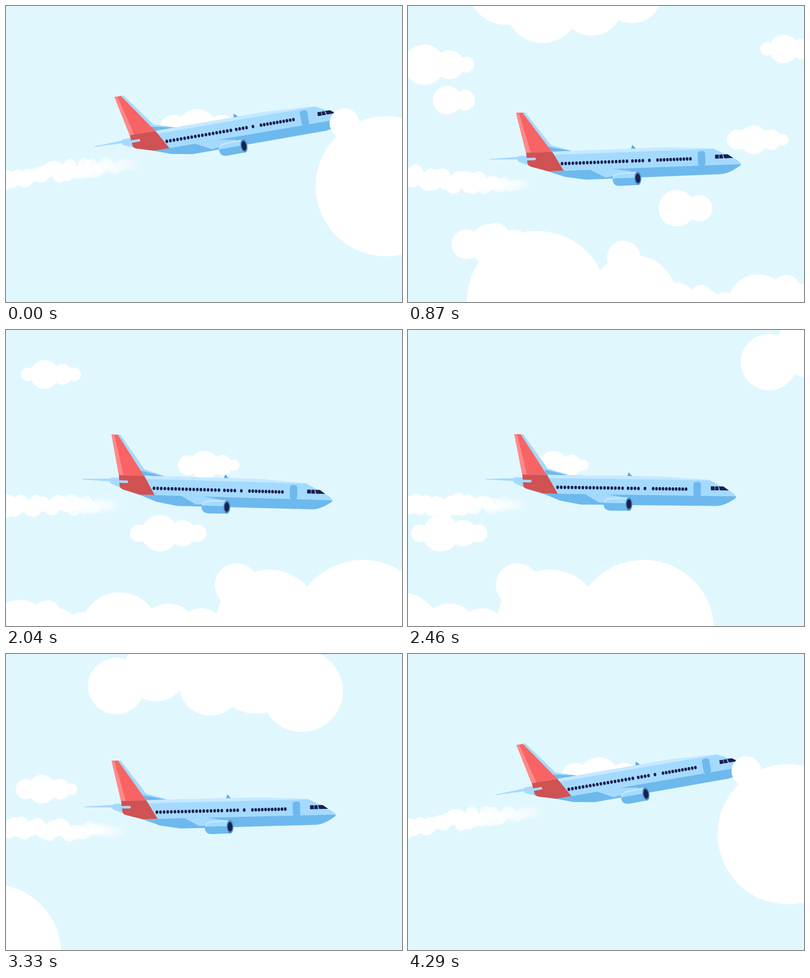
Write an HTML page with a canvas that moves like this. It is 800 by 600 pixels and loops after 4.32 s.

```html
<!DOCTYPE html>
<html lang="en">
<head>
<meta charset="utf-8">
<title>Plane in the clouds</title>
<style>
html, body { margin: 0; width: 100%; height: 100%; overflow: hidden; background: #e1f7fe; }
canvas { display: block; }
</style>
</head>
<body>
<canvas id="stage" width="800" height="600"></canvas>
<script>
const ctx = document.getElementById('stage').getContext('2d');
const LOOP = 4320, CYCLE = 4290, STEP = 30, SWAP = 3560;
const SKY = '#e1f7fe', LIGHT = '#a5daff', BLUE = '#6db9ed', SHINE = '#c6e9ff', NAVY = '#1a1f50';
const PIVOT = { x: 180, y: 10 };

const bump = (t, mid, width) => Math.exp(-(((t - mid) / width) ** 2));
const wave = (t, peak, period) => Math.cos(2 * Math.PI * (t - peak) / period);

// The plane climbs around time zero, then sways in level flight.
function pose(t) {
  const climb = bump(t, 280, 500);
  return {
    x: 485 + 26 * climb - 6.5 * bump(t, 2100, 400),
    y: 331.5 + 5.7 * wave(t, 1750, 2800) - 77 * bump(t, 100, 490),
    angle: (1.9 * wave(t, 1700, CYCLE) - 11.3 * climb) * Math.PI / 180,
    roll: bump(t, 2750, 800)
  };
}
const camera = t => 600 / (1 + Math.exp((t + 78) / 179));

// A cloud is one main disc with smaller ones beside it; sizes are relative.
function cloud(x, y, r, left = 0, tail = 0) {
  return [
    [x - 1.15 * r, y, left * r], [x, y, r],
    [x + 1.23 * r, y, 0.72 * r], [x + 2.06 * r, y, tail * r]
  ];
}

// Positions are those at 870 ms.
const far = [
  ...cloud(165, 486, 41, 0.73, 0.39),
  ...cloud(698, 274, 29, 0.7, 0.39)
];
const near = [
  ...cloud(33, 122, 41, 0, 0.39),
  ...cloud(79, 194, 29),
  ...cloud(543, 413, 37),
  ...cloud(759, 90, 29, 0.48, 0.48),
  ...cloud(992, 412, 37, 0.48, 0.48),
  // upper banks
  [199, -39, 80], [272, 3, 75], [371, 0, 63], [452, -24, 62],
  [1655, 65, 57], [1735, 32, 64], [1783, -24, 54], [1845, 62, 63], [1938, 29, 92], [2030, 75, 83],
  // lower bank
  [261, 601, 142], [455, 596, 88], [1212, 592, 106], [1402, 608, 142],
  ...cloud(538, 613, 50, 0, 0.6),
  ...cloud(708, 609, 62, 0, 0.6),
  ...cloud(911, 612, 80, 0, 0.6),
  [177, 473, 30], [436, 513, 34], [593, 588, 20], [764, 577, 29], [1147, 517, 44]
];
const wipe = [
  [-38, 235, 364], [352, 619, 355], [775, 710, 268], [851, -28, 60],
  ...[0, 300, 600].map(y => [-1000, y, 220])
];

function disc(x, y, rx, ry = rx) {
  ctx.beginPath();
  ctx.ellipse(x, y, rx, ry, 0, 0, 7);
  ctx.fill();
}
function shape(color, d) {
  ctx.fillStyle = color;
  ctx.fill(new Path2D(d));
}
function clouds(list, dx, dy) {
  ctx.fillStyle = '#fff';
  for (const [x, y, r] of list) disc(x + dx, y + dy, r);
}
function random(n) {
  const v = Math.sin(n * 127.1 + 3.7) * 43758.5453;
  return v - Math.floor(v);
}

// Each puff stays at the height where the engine left it.
function trail(t) {
  const gap = 13, back = -72 - PIVOT.x, low = 37 - PIVOT.y;
  ctx.fillStyle = '#fff';
  for (let k = Math.floor(t / gap), age; (age = t - k * gap) < 680; k--) {
    const { x, y, angle } = pose(k * gap), grow = Math.min(1, age / 250);
    const sin = Math.sin(angle), cos = Math.cos(angle);
    ctx.globalAlpha = Math.min(1, 0.12 + age / 300);
    disc(
      x + back * cos - low * sin - age * 0.5,
      y + back * sin + low * cos + (random(k) - 0.5) * (8 + 14 * grow),
      11 + random(k + 0.5) * 6 * grow
    );
  }
  ctx.globalAlpha = 1;
}

function windows(x, count, gap) {
  for (let i = 0; i < count; i++) disc(x + i * gap, 0, 2.7, 3.5);
}

// Local origin is the rearmost cabin window.
function plane(t) {
  const { x, y, angle, roll } = pose(t);
  const edge = 14.6 - 1.5 * roll, shift = 3 * roll;
  ctx.save();
  ctx.translate(x, y);
  ctx.rotate(angle);
  ctx.translate(-PIVOT.x, -PIVOT.y);

  // tail fin
  shape(LIGHT, 'M-76 -106.3L-71 -106.8L-20.6 -37.8L22 -25H-24Z');
  shape(BLUE, 'M-27 -35L20 -25H-22Z');
  shape('#f86464', `M-89 -106.4H-76L${-19 - shift} -24H-71.7Z`);
  shape('#ff898b', 'M-89 -106.4H-83.5L-62 -24H-71.7Z');

  // tail cone and stabiliser
  shape(LIGHT, 'M-146 -14.8L-89 -17V-11.5L-146 -13.6Z');
  shape(LIGHT, 'M-70 -19H-85Q-90 -19 -90 -13Q-90 -8 -86 -6.5L-68 1Z');

  // fuselage
  shape('#5ea9dd', 'M140.5 -24L143 -32.6L151 -24Z');
  shape(LIGHT, 'M-71 -24.7L209 -24.9L306 -19.3L345 1Q360 9 361 15H-28L-63 4L-70 0Z');
  shape(SHINE, 'M-21 -24.8L209 -24.9L306 -19.3V-18.5H-17Z');
  shape('#d05252', `M-71.7 -24.7H${-19 - shift}L${3 - shift} ${edge}H-28L-63 4Q-70 2 -70 -6Z`);
  shape(LIGHT, 'M-72 -14.2H-55Q-52.5 -14 -52.5 -11.5Q-52.5 -9 -55 -9H-72Z');
  shape(BLUE, `M-29 ${edge}H361Q361 17 357 19Q337 33 321 33.3L47 34.4L5 27Z`);
  shape(LIGHT, `M55 ${edge - 0.5}L${87 - shift} ${31.5 - 2 * roll}L105 29L140 25L137 ${20 - roll}L101 ${edge}Z`);

  ctx.fillStyle = BLUE;
  ctx.beginPath();
  ctx.roundRect(274.5, -14.8, 15, 30, 5);
  ctx.fill();

  ctx.fillStyle = NAVY;
  windows(0, 19, 7.29);
  windows(142.3, 4, 7);
  windows(176.5, 1, 0);
  windows(193, 11, 6.65);
  shape(NAVY, 'M309.5 -6.4H317.2V1.5H309.5ZM318.3 -6.4H324.2L326 1.5H318ZM325.5 -6.4H335L346 1.5H328Z');

  // engine
  ctx.translate(-8.4 * roll, -4 * roll);
  shape(BLUE, 'M152 22L115 23Q101 25 101 36Q101 49 115 49.5L152 49Z');
  shape(LIGHT, 'M152 22L115 23Q102 25 101 34H152Z');
  shape(SHINE, 'M152 22L115 23Q103 24.5 101.3 33H103.5Q105 26.5 116 26L145 25Z');
  ctx.fillStyle = '#5292c4';
  disc(152, 35.5, 7, 13.6);
  ctx.fillStyle = NAVY;
  disc(152, 35.5, 4.9, 9.8);
  ctx.restore();
}

function draw(clock) {
  const t = Math.floor((clock % LOOP) / STEP) * STEP;
  // The scene restarts while the big cloud covers everything.
  const scene = t < SWAP ? t : Math.min(t, CYCLE) - CYCLE;
  const dy = -camera(scene), since = 870 - scene, nearX = since * 0.5822;

  ctx.fillStyle = SKY;
  ctx.fillRect(0, 0, 800, 600);
  clouds(far, since * 0.254, dy);
  trail(scene);
  plane(scene);
  clouds(near, nearX, dy);
  ctx.fillRect(262 + nearX, 589 + dy, 1140, 120);

  if (t > 3380 && t < 3790) {
    const dx = (3660 - t) * 9;
    clouds(wipe, dx, 0);
    ctx.fillRect(dx - 1000, 0, 1010, 600);
  }
}

const start = performance.now();
function tick() {
  draw(performance.now() - start);
  requestAnimationFrame(tick);
}
tick();
</script>
</body>
</html>
```
